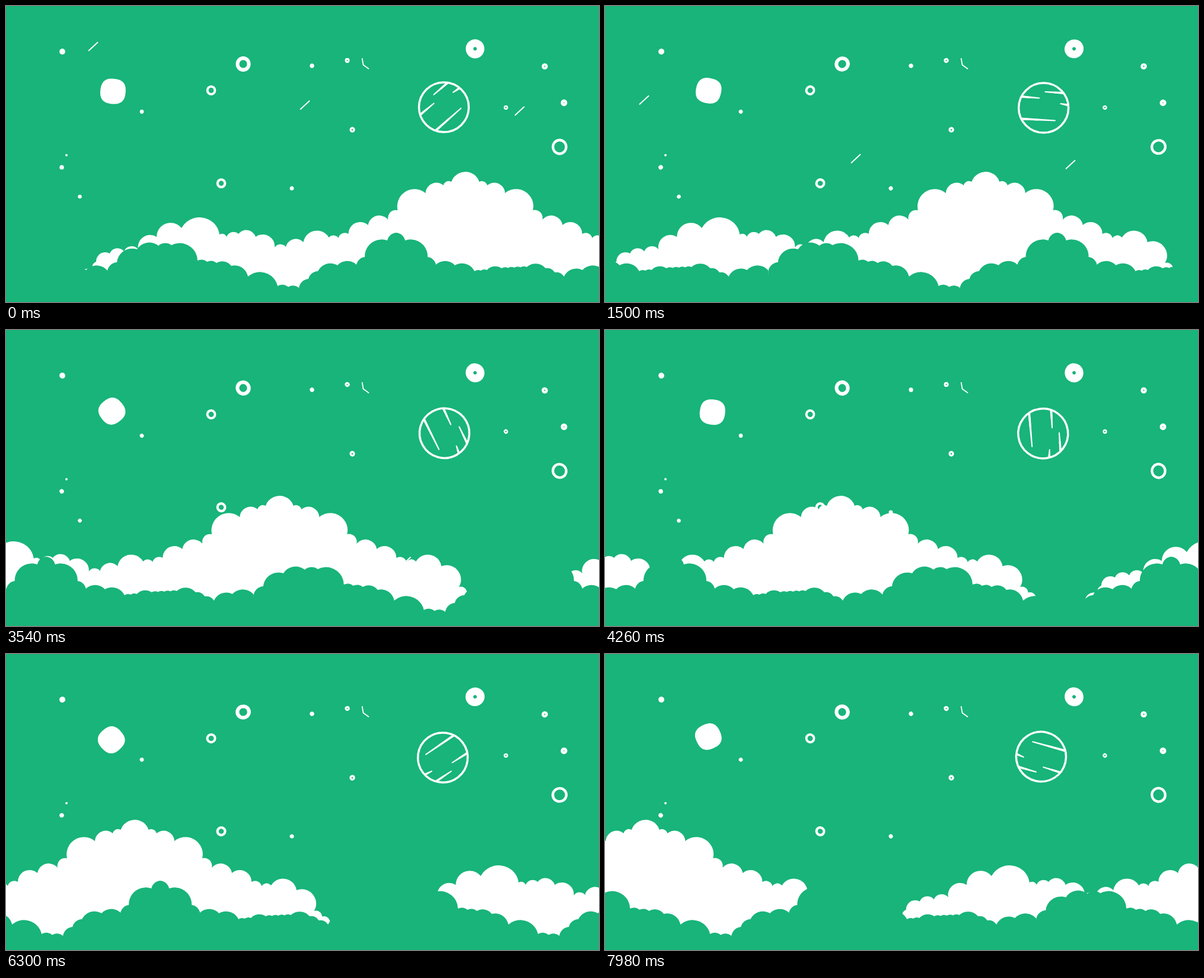
Recreate the animation shown at these times as an HTML page with a canvas. Size 1000 px wide and 500 px high, loop 8 s.

```html
<!DOCTYPE html>
<html lang="en">
<head>
<meta charset="utf-8">
<title>Night sky</title>
<style>
html, body { margin: 0; width: 100%; height: 100%; overflow: hidden; background: #18b47a; }
canvas { display: block; width: 1000px; height: 500px; }
</style>
</head>
<body>
<canvas id="sky" width="1000" height="500"></canvas>
<script>
const ctx = document.getElementById('sky').getContext('2d');
const GREEN = '#18b47a', WHITE = '#fff';
const LOOP = 8000, STEP = 60, TAU = 2 * Math.PI, DEG = TAU / 360;

// A symmetric mountain: points are [distance from the axis, y], from the top down.
function mountain(axis, half) {
  const side = sign => half.map(([d, y]) => [axis + sign * d, y]);
  return [...side(-1).reverse(), ...side(1)];
}

// Key points are [x, y, number of equal bumps leading there].
const back = { period: 1062, puff: 0.2, keys: [
  [125, 456], [147, 446], [152, 432], [175, 418], [223, 411, 2], [254, 390],
  [296, 375], [360, 386], [372, 390], [392, 385], [421, 390], [453, 408], [472, 407],
  ...mountain(774.5, [[23.5, 297], [37, 303], [67, 316], [114, 345], [130, 361],
    [164, 370], [197, 385], [214, 392], [230, 391], [273, 399]]),
  [1077, 434], [1104, 453, 2], [1134, 488, 2]] };

const front = { period: 837, puff: 0.1, keys: [
  [171, 447], [187, 433], [221, 411], [257, 405], [279, 404], [323, 430],
  [355, 434, 2], [380, 439], [408, 457], [458, 473], [494, 476, 2], [510, 461],
  ...mountain(658, [[0, 383], [15, 396], [53, 424], [67, 437], [99, 438], [132, 448]]),
  [811, 446, 2], [836, 443], [878, 441, 4], [910, 443], [941, 457, 2],
  [972, 446], [1008, 447]] };

// x, y, radius, hole radius
const stars = [
  [95, 77, 5], [229, 178.5, 3.4], [102, 252, 2], [94, 272.5, 3.8],
  [124.5, 322, 3.3], [516, 101, 3.7], [482, 308, 3.5],
  [346, 142.5, 8.5, 4.5], [363, 299.5, 8.5, 4.3], [400, 98, 12.8, 6.7], [933.5, 238, 13.5, 9.2],
  [575.5, 92, 4.1, 1], [584, 209, 4.7, 1.3], [843, 171.5, 3.7, 1.2],
  [908.5, 102, 5.3, 1.1], [791, 72.3, 16, 2.9], [941, 163.5, 5.6, 0.8]];

const meteors = [[139, 76], [496, 175], [858, 185]];

function line(width, ...p) {
  ctx.lineWidth = width;
  ctx.beginPath();
  for (let i = 0; i < p.length; i += 2) ctx.lineTo(p[i], p[i + 1]);
  ctx.stroke();
}

function oval(color, x, y, r, turn) {
  ctx.fillStyle = color;
  ctx.beginPath();
  ctx.ellipse(x, y, r * 0.98, r * 1.01, turn, 0, TAU);
  ctx.fill();
}

function spin(x, y, deg, draw) {
  ctx.save();
  ctx.translate(x, y);
  ctx.rotate(deg * DEG);
  draw();
  ctx.restore();
}

// Round arc over the chord; longer chords puff up more.
function bump(x0, y0, x1, y1, puff) {
  const dx = x1 - x0, dy = y1 - y0, c = Math.hypot(dx, dy);
  const h = c * Math.min(0.36, puff + 0.0035 * c);
  const r = (c * c / 4 + h * h) / (2 * h), k = (r - h) / c;
  const cx = (x0 + x1) / 2 - dy * k, cy = (y0 + y1) / 2 + dx * k;
  ctx.arc(cx, cy, r, Math.atan2(y0 - cy, x0 - cx), Math.atan2(y1 - cy, x1 - cx));
}

function cloud({ keys, puff }, shift) {
  ctx.save();
  ctx.translate(shift, 0);
  ctx.beginPath();
  let [x, y] = keys[0];
  const start = x;
  ctx.moveTo(x, y);
  for (const [kx, ky, n = 1] of keys.slice(1)) {
    const dx = (kx - x) / n, dy = (ky - y) / n;
    for (let i = 0; i < n && dx; i++) {
      bump(x, y, x + dx, y + dy, puff);
      x += dx;
      y += dy;
    }
  }
  ctx.lineTo(x + 2, 501);
  ctx.lineTo(start - 2, 501);
  ctx.fill();
  ctx.restore();
}

// Nearly round stone with one soft corner, set off from its pivot
function stone() {
  ctx.beginPath();
  for (let a = 0; a < TAU; a += 0.05) {
    const r = 22.1 + 0.8 * Math.cos(4 * a) + 0.6 * Math.cos(a);
    ctx.lineTo(r * Math.cos(a + 0.12), r * Math.sin(a + 0.12) - 4);
  }
  ctx.fill();
}

// Each stripe runs from the rim at height y inwards, tapering to its tip.
function stripe(side, y, length, drop) {
  const R = 42, x = side * Math.sqrt(R * R - y * y), tip = x - side * length;
  line(2, x, y - 1, tip, y + drop, x, y + 1);
  line(2.8, x, y, (x + tip) / 2, y + drop / 2);
}

function planet() {
  ctx.translate(2, -0.9);
  ctx.lineWidth = 3.5;
  ctx.beginPath();
  ctx.arc(0, 0, 42, 0, TAU);
  ctx.stroke();
  stripe(-1, -19, 30, 2.5);
  stripe(1, -25, 31, -2);
  stripe(1, -4.5, 13, -2.5);
  stripe(-1, 18.5, 57, 3);
}

function draw(t) {
  ctx.fillStyle = GREEN;
  ctx.fillRect(0, 0, 1000, 500);
  ctx.lineCap = ctx.lineJoin = 'round';

  for (const [x, y, r, hole = 0] of stars) {
    oval(WHITE, x, y, r, t * 0.04 * DEG);
    oval(GREEN, x, y, hole, t * 0.04 * DEG);
  }

  ctx.fillStyle = ctx.strokeStyle = WHITE;
  line(1.8, 600.7, 89, 602.5, 99.5, 611.5, 106);
  spin(178, 141, (t - 3540) * 0.0638, stone);
  spin(737.6, 173, (t - 1500) * 0.0297, planet);

  for (const [x, y] of meteors) {
    const mx = x - t * 0.0541, my = y + t * 0.0603;
    line(2, mx + 0.7, my - 0.7, mx + 15.5, my - 14.5);
  }

  const left = -t * 0.0885, right = t * 0.0697;
  cloud(back, left);
  cloud(back, left + back.period);
  ctx.fillStyle = GREEN;
  cloud(front, right);
  cloud(front, right - front.period);
}

const begin = performance.now();
function tick(now) {
  const t = Math.max(0, now - begin) % LOOP;
  draw(Math.floor(t / STEP) * STEP);
  requestAnimationFrame(tick);
}
draw(0);
requestAnimationFrame(tick);
</script>
</body>
</html>
```
